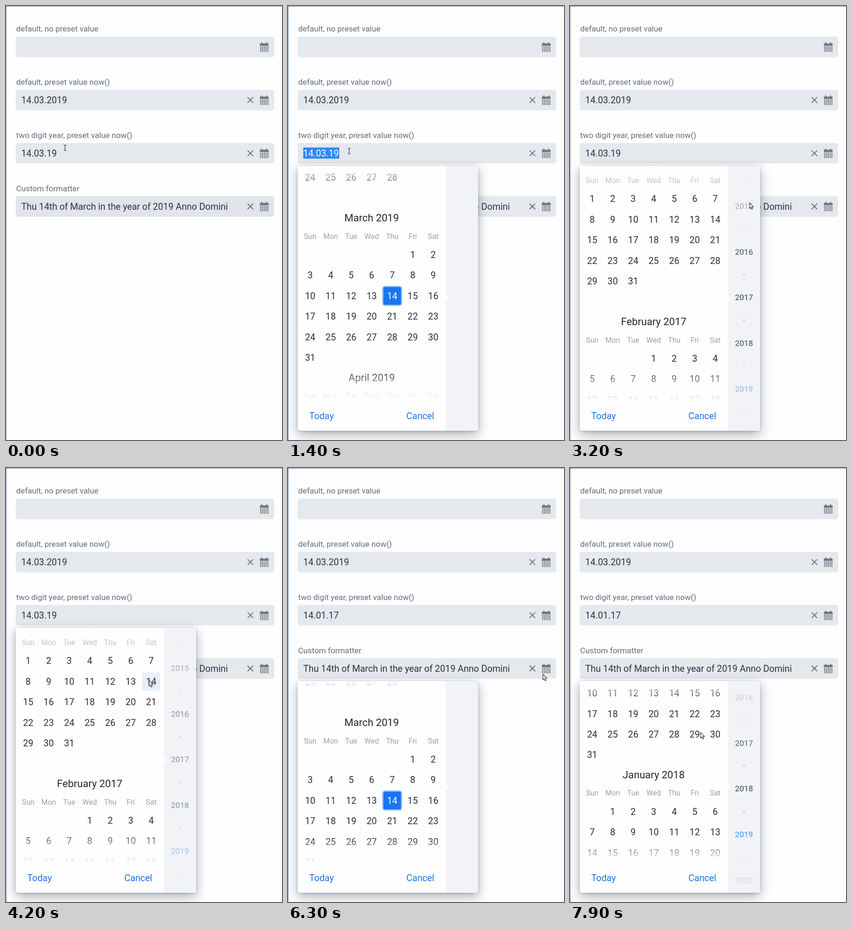
An HTML page with a canvas for the animation above (8 s loop, 598 px wide and 937 px high).

```html
<!DOCTYPE html>
<html lang="en">
<head>
<meta charset="utf-8">
<title>Date pickers</title>
<style>
  html, body { margin: 0; width: 100%; height: 100%; overflow: hidden; background: #fefdff; }
  canvas { display: block; }
</style>
</head>
<body>
<canvas id="stage" width="598" height="937"></canvas>
<script>
const ctx = document.getElementById('stage').getContext('2d');
const LOOP = 8000, BLUE = '#1676f3', INK = '#2b3442', PAPER = '#fefefe', STRIP = '#f1f3f6';
const CELL = 44.44, MONTH = 344.4, YEAR = 98.7, BOTTOM = 917, FOOTER = 854;
const WEEK = ['Sun', 'Mon', 'Tue', 'Wed', 'Thu', 'Fri', 'Sat'];
const LABELS = ['default, no preset value', 'default, preset value now()',
  'two digit year, preset value now()', 'Custom formatter'];

// pointer stops: time, x, y
const PATH = [[100, 128, 306], [400, 132.5, 313], [1700, 132.5, 313], [2450, 389, 425],
  [3400, 389, 425], [4000, 310, 459], [4700, 310, 459], [5150, 560, 440],
  [6200, 560, 440], [6900, 377, 571], [7550, 377, 571], [7850, 283, 571]];

let t = 0;
const ramp = (a, b) => Math.min(1, Math.max(0, (t - a) / (b - a)));
const pulse = (a, b, c, d) => ramp(a, b) * (1 - ramp(c, d));
const ease = p => p < .5 ? 2 * p * p : 1 - 2 * (1 - p) * (1 - p);
const mix = (a, b, p) => a + (b - a) * p;
const fieldY = i => 88.3 + 114.8 * i;

// text whose capitals are centred on y
function text(str, x, y, size, color, align = 'left') {
  ctx.font = size + 'px Roboto, sans-serif';
  ctx.textAlign = align;
  ctx.fillStyle = color;
  ctx.fillText(str, x, y + size * .3555);
}

function box(x, y, w, h, r, color) {
  ctx.fillStyle = color;
  ctx.beginPath();
  ctx.roundRect(x, y, w, h, r);
  ctx.fill();
}

const square = (x, y, size, r, color) => box(x - size / 2, y - size / 2, size, size, r, color);

function calendarIcon(y, color) {
  box(550, y - 7.5, 19, 5, 0, color);
  box(553, y - 10, 2.5, 4, 1, color);
  box(563.5, y - 10, 2.5, 4, 1, color);
  for (let r = 0; r < 4; r++)
    for (let c = 0; c < 5; c++) box(550.5 + 3.9 * c, y - 1.2 + 3.1 * r, 2.6, 2.2, 0, color);
}

function clearIcon(y) {
  ctx.strokeStyle = '#69717d';
  ctx.lineWidth = 2;
  ctx.beginPath();
  for (const s of [-6, 6]) {
    ctx.moveTo(523.5, y - s);
    ctx.lineTo(535.5, y + s);
  }
  ctx.stroke();
}

function fields() {
  const values = ['', '14.03.2019', t < 4500 ? '14.03.19' : '14.01.17',
    'Thu 14th of March in the year of 2019 Anno Domini'];
  const hover = [0, 0, pulse(100, 300, 800, 1000),
    .5 * (1 - ramp(0, 300)) + pulse(5000, 5200, 5600, 5800)];
  values.forEach((value, i) => {
    const y = fieldY(i), h = hover[i];
    text(LABELS[i], 22, y - 39.3, 17.3, '#666c77');
    box(21, y - 22.2, 560, 44.4, 5, `rgb(${mix(229, 221, h)},${mix(232, 223, h)},${mix(236, 228, h)})`);
    const selected = i === 2 && t >= 800 && t < 2800;
    if (selected) box(33, y - 12.3, 78, 24, 0, '#2f88f8');
    text(value, 33, y, 19.8, selected ? '#fff' : INK);
    if (value) clearIcon(y);
    calendarIcon(y, i === 3 && t >= 5100 && t < 6200 ? '#2e353f' : '#6d7580');
  });
}

function month(m, y, hoverDay) {
  const first = new Date(2019, m, 1), start = first.getDay();
  const days = new Date(2019, m + 1, 0).getDate();
  const name = first.toLocaleString('en-US', { month: 'long' });
  text(name + ' ' + first.getFullYear(), 181.3, y, 22.2, '#23272e', 'center');
  WEEK.forEach((d, i) => text(d, 48 + CELL * i, y + 39.5, 16, '#9da1a7', 'center'));
  for (let d = 1; d <= days; d++) {
    const n = start + d - 1;
    const x = 48 + CELL * (n % 7), dy = y + 79.5 + CELL * Math.floor(n / 7);
    const chosen = m === 2 && d === 14;
    if (chosen) {
      square(x, dy, 43.2, 6, '#8bbcfa');
      square(x, dy, 39.8, 5, '#e8f2ff');
      square(x, dy, 38.6, 4, BLUE);
    } else if (d === hoverDay) square(x, dy, 39.5, 5, '#e7effc');
    text(d, x, dy, 19.8, chosen ? '#fff' : '#2b2f36', 'center');
  }
}

// covers an area with its own background, leaving it clear between stops a and b
function fade(x, w, top, bottom, rgb, a, b) {
  const g = ctx.createLinearGradient(0, top, 0, bottom);
  [[0, 1], [a, 0], [b, 0], [1, 1]].forEach(([p, o]) => g.addColorStop(p, `rgba(${rgb},${o})`));
  ctx.fillStyle = g;
  ctx.fillRect(x, top, w, bottom - top);
}

function clipped(x, y, w, h, draw) {
  ctx.save();
  ctx.beginPath();
  ctx.rect(x, y, w, h);
  ctx.clip();
  draw();
  ctx.restore();
}

// pos counts months from January 2019; titleY is where month pos has its title
function popup({ top, titleY, pos, alpha, years, hoverMonth }) {
  if (!alpha) return;
  const mid = (top + BOTTOM) / 2, height = BOTTOM - top;
  ctx.save();
  ctx.globalAlpha = alpha;
  for (const [dy, blur, o] of [[8, 25, .36], [1, 5, .22]]) {
    ctx.shadowColor = `rgba(25,41,60,${o})`;
    ctx.shadowOffsetY = dy;
    ctx.shadowBlur = blur;
    box(21, top, 391, height, 5, PAPER);
  }
  ctx.shadowColor = 'transparent';

  clipped(21, top, 321, FOOTER - top, () => {
    for (let m = Math.floor(pos) - 2; m < pos + 3; m++)
      month(m, titleY + (m - pos) * MONTH, m === hoverMonth ? 14 : 0);
    fade(21, 321, top, FOOTER, '254,254,254', .1, .85);
  });
  text('Today', 46, 885, 19.8, '#1e74e6');
  text('Cancel', 256.5, 885, 19.8, '#1e74e6');

  box(342, top, 70, height, [0, 5, 5, 0], STRIP);
  clipped(342, top, 70, height, () => {
    ctx.globalAlpha = alpha * years;
    const now = 2019 + pos / 12 - .01;
    for (let y = Math.floor(now) - 4; y < now + 4; y++) {
      const cy = mid + (y - now) * YEAR;
      text(y, 377, cy, 17.3, y === 2019 ? BLUE : '#3b424d', 'center');
      square(377, cy + YEAR / 2, 3, 1.5, '#a9aeb6');
    }
    fade(342, 70, top, BOTTOM, '241,243,246', .35, .65);
  });
  ctx.fillStyle = PAPER;
  ctx.beginPath();
  ctx.moveTo(341.5, mid - 7.5);
  ctx.lineTo(349, mid);
  ctx.lineTo(341.5, mid + 7.5);
  ctx.fill();
  ctx.restore();
}

function pointerAt() {
  const i = PATH.findIndex(k => k[0] > t);
  if (i === 0) return PATH[0].slice(1);
  if (i < 0) return PATH[PATH.length - 1].slice(1);
  const [t0, x0, y0] = PATH[i - 1], [t1, x1, y1] = PATH[i];
  const p = ease(ramp(t0, t1));
  return [mix(x0, x1, p), mix(y0, y1, p)];
}

function pointer(covered) {
  const [x, y] = pointerAt();
  const inField = LABELS.some((_, i) => Math.abs(y - fieldY(i)) < 22);
  ctx.save();
  ctx.translate(x, y);
  ctx.lineWidth = 1.2;
  ctx.strokeStyle = '#33363b';
  ctx.fillStyle = '#fff';
  ctx.beginPath();
  if (inField && x < 515 && !(covered && y > 345 && x < 412)) {
    for (const s of [-1, 1]) {
      ctx.moveTo(-3, 6 * s);
      ctx.quadraticCurveTo(0, 6 * s, 0, 4 * s);
      ctx.quadraticCurveTo(0, 6 * s, 3, 6 * s);
    }
    ctx.moveTo(0, -5);
    ctx.lineTo(0, 5);
  } else {
    [[0, 0], [0, 12], [2.8, 9.5], [4.7, 14], [6.8, 13.1], [4.9, 8.8], [8.5, 8.6]]
      .forEach(p => ctx.lineTo(...p));
    ctx.closePath();
    ctx.fill();
  }
  ctx.stroke();
  ctx.restore();
}

function draw(ms) {
  t = ms % LOOP;
  ctx.fillStyle = '#fefdff';
  ctx.fillRect(0, 0, 598, 937);
  fields();
  box(0, 0, 1.3, 937, 0, t < 800 ? '#a5a5a9' : '#86a9d2');
  box(0, 0, 598, 1, 0, '#77777c');

  const first = pulse(800, 1000, 4500, 4680);
  popup({
    top: 345, titleY: 457.5, alpha: first,
    pos: mix(2, -23.65, ease(ramp(2800, 3100))),
    years: pulse(2450, 2720, 4070, 4370),
    hoverMonth: t > 3850 ? -24 : null
  });
  popup({
    top: 460, titleY: 549.5, alpha: ramp(5600, 5800),
    pos: mix(2, -12.327, ease(ramp(7450, 7750))),
    years: ramp(6700, 6950)
  });
  pointer(first > 0);
  requestAnimationFrame(draw);
}
requestAnimationFrame(draw);
</script>
</body>
</html>
```
